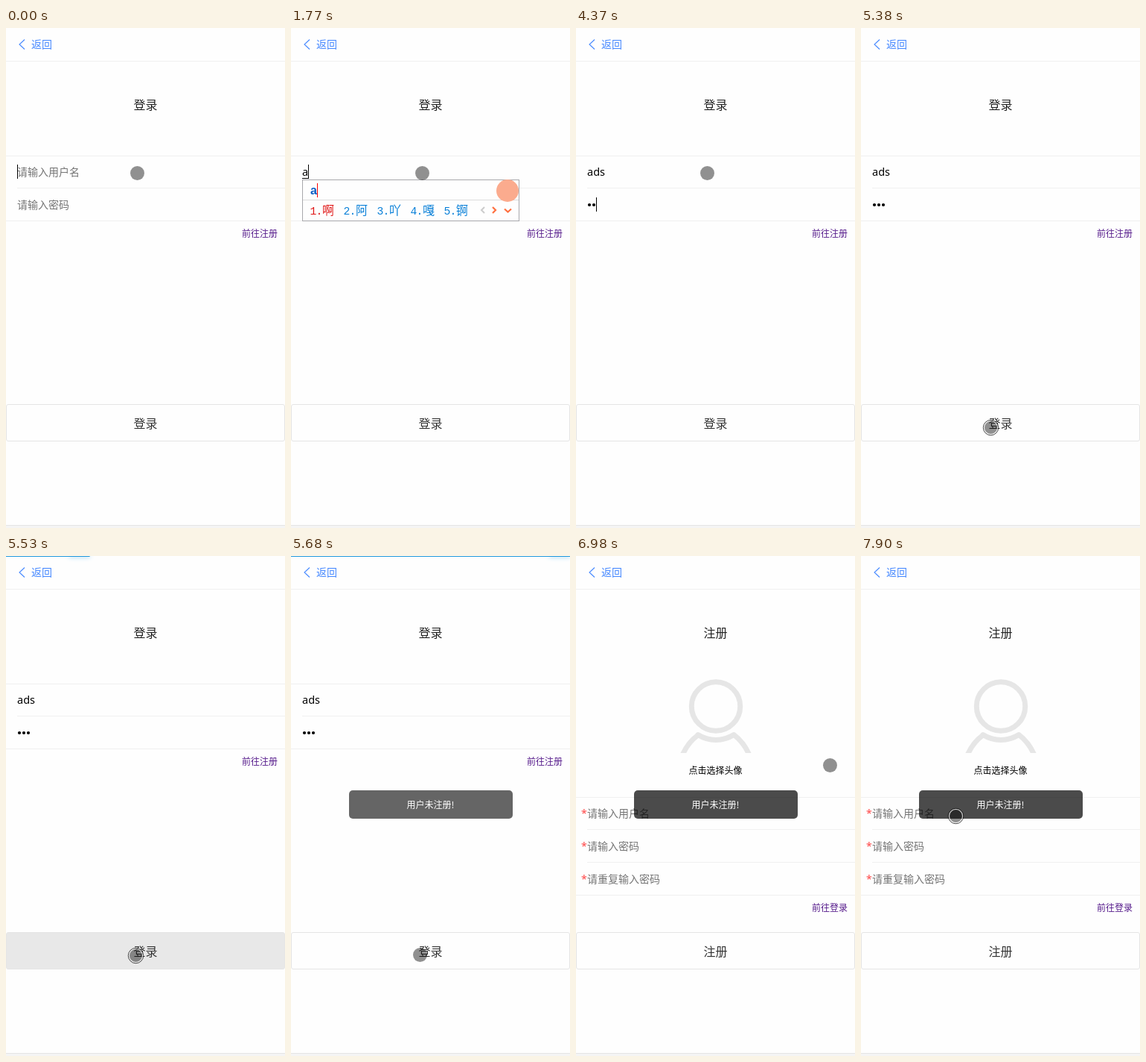
These frames come from a looping animation (375 px wide and 670 px high, 8 s). An HTML page with a canvas:

```html
<!DOCTYPE html>
<html lang="zh-CN">
<head>
<meta charset="utf-8">
<title>登录</title>
<style>
html, body { margin: 0; width: 100%; height: 100%; overflow: hidden; background: #fefefe; }
canvas { display: block; width: 375px; height: 670px; }
</style>
</head>
<body>
<canvas id="stage"></canvas>
<script>
const W = 375, H = 670, LOOP = 8000;
const canvas = document.getElementById('stage');
const ctx = canvas.getContext('2d');
const ratio = window.devicePixelRatio || 1;
canvas.width = W * ratio;
canvas.height = H * ratio;

const SANS = '"Noto Sans", "Noto Sans CJK SC", "Noto Sans CJK", sans-serif';
const CJK = '"Noto Sans CJK SC", "Noto Sans CJK", sans-serif';
const MONO = '"Liberation Mono", monospace';
const BLUE = '#0a80d8', RED = '#e01818', ORANGE = '#ff7040', LINK = '#4588ff';
const USER = 'ads';

// Cursor: time, x, y, pressed
const PATH = [
  [0, 176.5, 194.5], [4920, 175.5, 194.5], [5080, 180.5, 466.5],
  [5230, 173.5, 527.5], [5380, 174.5, 535.5, true], [5530, 174.5, 535.5, true],
  [5680, 173.5, 534.5], [6230, 230, 440], [6350, 286.5, 347.5],
  [6500, 334, 290], [6620, 341.5, 280.5], [6740, 341.5, 280.5, true],
  [6860, 341.5, 280.5], [7480, 258.5, 346.5], [7630, 262.5, 310],
  [7750, 194.5, 273.5], [7900, 127.5, 348.5, true]
];
// Input method: time, letters typed, candidates
const TYPING = [
  [0, 0], [1770, 1, ['啊', '阿', '吖', '嘎', '锕']],
  [2170, 2, ['按班', '阿爸', '爱吧', '安保', '暗部']],
  [2450, 3, [USER, USER.toUpperCase(), '按错', '安保处', '俺不吃']],
  [3100, 3]
];
// Caret: time, field (0 none, 1 user, 2 password)
const CARET = [
  [0, 1], [270, 0], [830, 1], [1330, 0], [1770, 1], [2940, 0], [3100, 1],
  [3500, 2], [4060, 0], [4370, 2], [5080, 0]
];
const DOTS = [[0, 0], [4370, 2], [4520, 3]];
const TOAST = [[0, 0], [5680, 0.6], [5800, 0.7]];
const BAR = [[0, 0], [5530, 0.3], [5680, 1], [5800, 0]];

const at = (keys, t) => keys.filter(k => k[0] <= t).pop();

function rect(x, y, w, h, color) {
  ctx.fillStyle = color;
  ctx.fillRect(x, y, w, h);
}

function line(points, color, width) {
  ctx.beginPath();
  points.forEach(([x, y]) => ctx.lineTo(x, y));
  ctx.strokeStyle = color;
  ctx.lineWidth = width;
  ctx.stroke();
}

function circle(x, y, r, fill, stroke, width) {
  ctx.beginPath();
  ctx.arc(x, y, r, 0, Math.PI * 2);
  if (fill) { ctx.fillStyle = fill; ctx.fill(); }
  if (stroke) { ctx.strokeStyle = stroke; ctx.lineWidth = width; ctx.stroke(); }
}

function text(s, x, cy, size, color, align = 'left', weight = 400, family = CJK) {
  ctx.font = `${weight} ${size}px ${family}`;
  ctx.textAlign = align;
  ctx.fillStyle = color;
  ctx.fillText(s, x, Math.round(cy + size * 0.38));
}

// Fixed grid text: Latin characters take half an em. Returns the end x.
function gridText(s, x, cy, size, color) {
  const base = Math.round(cy + size * 0.38);
  ctx.fillStyle = color;
  ctx.textAlign = 'center';
  for (const ch of s) {
    const wide = ch > '\u2e80';
    const step = wide ? size : size / 2;
    ctx.font = wide ? `300 ${size}px ${CJK}` : `${size * 0.92}px ${MONO}`;
    ctx.fillText(ch, x + step / 2, base);
    x += step;
  }
  return x;
}

const rule = (y, x = 0) => rect(x, y, W - x, 1, '#f0f0f0');

function frame(title, link, linkY, pressed) {
  rect(0, 0, W, H, '#fefefe');
  line([[25, 15.5], [18, 22], [25, 28.5]], LINK, 1.1);
  text('返回', 34, 22, 14, LINK);
  rule(44);
  text(title, 187.5, 103, 16, '#222', 'center', 500);
  text(link, 365, linkY, 12, '#551a8b', 'right');
  ctx.beginPath();
  ctx.roundRect(0.5, 504.5, 374, 49, 2.5);
  ctx.fillStyle = pressed ? '#e8e8e8' : '#fefefe';
  ctx.fill();
  ctx.strokeStyle = '#e5e5e5';
  ctx.lineWidth = 1;
  ctx.stroke();
  text(title, 187.5, 529.5, 16, '#333', 'center');
  rect(0, 666, W, 1, '#e4e4e4');
  rect(0, 667, W, 3, '#f4f4f4');
}

function userWidth(count) {
  ctx.font = `14.5px ${SANS}`;
  return Math.round(ctx.measureText(USER.slice(0, count)).width);
}

function loginPage(t) {
  frame('登录', '前往注册', 275.5, t >= 5530 && t < 5680);
  rule(171);
  rule(214, 15);
  rule(258);
  const [, count, list] = at(TYPING, t);
  const dots = at(DOTS, t)[1];
  const field = at(CARET, t)[1];
  const end = 15 + userWidth(count);

  if (count) text(USER.slice(0, count), 15, 192, 14.5, '#000', 'left', 400, SANS);
  else text('请输入用户名', 15, 193, 14, '#757575');
  if (!dots) text('请输入密码', 15, 237, 14, '#757575');
  for (let i = 0; i < dots; i++) circle(18 + i * 6, 237, 2.1, '#000');

  if (list) {
    rect(15, 201, end - 15, 1, '#000');
    if (count === 3) {
      const wave = [];
      for (let x = 15; x <= end; x += 2) wave.push([x, x % 4 === 3 ? 200 : 202]);
      line(wave, '#f00', 1);
    }
  }
  if (field === 1) rect(end, 183, 1, 19, '#000');
  if (field === 2) rect(15 + dots * 6, 227, 1, 19, '#000');
  if (list) inputMethod(t, count, list);
}

function inputMethod(t, count, list) {
  const size = s => [...s].reduce((n, ch) => n + (ch > '\u2e80' ? 16 : 8), 16);
  const mark = s => s === '按错' ? 11 : 0;
  const last = 26 + list.reduce((n, s) => n + size(s) + mark(s), 0) + 13 * (list.length - 1);
  const right = last + 69;
  rect(15, 203, right - 15, 56, '#a8a8ac');
  rect(16, 204, right - 17, 54, '#fefefe');
  rect(16, 230, right - 17, 1, '#dcdcdc');
  circle(right - 16, 218, 15, '#fbab8e');

  const typed = USER.slice(0, count);
  text(typed, 26, 217, 16, '#0a5cc4', 'left', 700, '"Liberation Sans", sans-serif');
  rect(26 + Math.round(ctx.measureText(typed).width), 208, 1, 19, '#f00');

  let x = 26;
  list.forEach((s, i) => {
    x = gridText(`${i + 1}.${s}`, x, 244, 16, i ? BLUE : RED);
    if (mark(s)) {
      circle(x + 5.5, 241.5, 5.2, null, BLUE, 1.1);
      line([[x + 3, 241.5], [x + 5, 243.7], [x + 8.5, 239.5]], BLUE, 1.2);
    }
    x += mark(s) + 13;
  });
  line([[last + 22, 240], [last + 18, 244], [last + 22, 248]], '#ccc', 2);
  line([[last + 33, 240], [last + 37, 244], [last + 33, 248]], ORANGE, 2.2);
  line([[last + 49, 242.5], [last + 53.5, 246.5], [last + 58, 242.5]], ORANGE, 2.2);

  if (t >= 2820) {
    circle(124.5, 216.5, 6.8, null, '#fba58a', 1.1);
    line([[128, 222.5], [133, 222.5], [130.5, 219.5]], '#fba58a', 1);
    rect(124, 213, 1.3, 1.5, '#fb8a66');
    rect(124, 215.5, 1.3, 5, '#fb8a66');
    gridText('更多英文补全(分号+E)', 137, 217, 12, '#0a70c4');
  }
}

function avatar() {
  ctx.save();
  ctx.beginPath();
  ctx.rect(140, 160, 96, 104);
  ctx.clip();
  circle(188, 201.5, 32.7, null, '#e6e6e6', 7);
  ctx.beginPath();
  ctx.moveTo(142.5, 268);
  ctx.quadraticCurveTo(150, 250, 164, 240);
  ctx.arc(188, 201, 45.5, Math.PI * 0.678, Math.PI * 0.322, true);
  ctx.quadraticCurveTo(226, 250, 233.5, 268);
  ctx.lineJoin = 'round';
  ctx.stroke();
  ctx.restore();
}

function registerPage() {
  frame('注册', '前往登录', 471.5, false);
  avatar();
  text('点击选择头像', 187.5, 287.5, 12, '#000', 'center');
  rule(323);
  rule(366, 15);
  rule(410, 15);
  rule(454);
  ['请输入用户名', '请输入密码', '请重复输入密码'].forEach((s, i) => {
    const y = 345 + i * 44;
    text('*', 7, y, 14, '#f44', 'left', 400, SANS);
    text(s, 15, y, 14, '#757575');
  });
}

function toast(alpha) {
  if (!alpha) return;
  ctx.beginPath();
  ctx.roundRect(78, 314, 220, 38, 5);
  ctx.fillStyle = `rgba(0,0,0,${alpha})`;
  ctx.fill();
  text('用户未注册!', 187.5, 333, 12, '#fff', 'center');
}

function progress(part) {
  if (!part) return;
  const end = W * part;
  ctx.save();
  ctx.shadowColor = '#29d';
  ctx.shadowBlur = 6 * ratio;
  rect(end - 28, -1, 28, 1.5, '#29d');
  ctx.restore();
  rect(0, 0, end, 1, '#29d');
}

function cursor([, x, y, pressed]) {
  if (!pressed) {
    circle(x, y, 9.5, 'rgba(0,0,0,.43)');
    return;
  }
  circle(x, y, 9, 'rgba(0,0,0,.43)');
  circle(x, y, 9.2, null, 'rgba(255,255,255,.7)', 1.5);
  circle(x, y, 10.2, null, 'rgba(0,0,0,.8)', 0.9);
}

function draw(t) {
  ctx.setTransform(ratio, 0, 0, ratio, 0, 0);
  if (t < 6860) loginPage(t);
  else registerPage();
  toast(at(TOAST, t)[1]);
  progress(at(BAR, t)[1]);
  cursor(at(PATH, t));
}

const start = performance.now();
function tick() {
  draw((performance.now() - start) % LOOP);
  requestAnimationFrame(tick);
}
tick();
</script>
</body>
</html>
```
